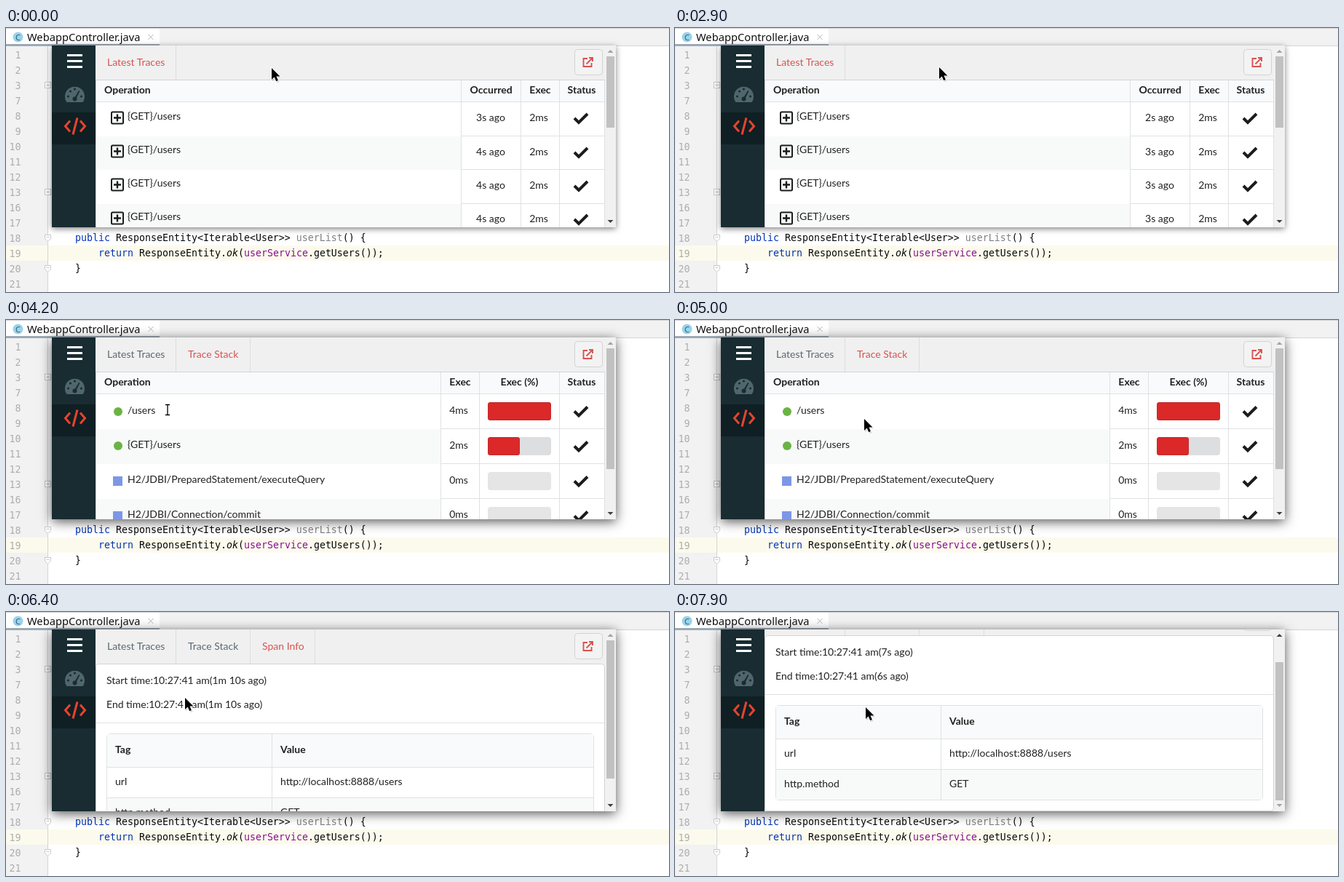
Recreate the animation shown at these times as an HTML page. Size 911x363 px, loop 8000 ms.

```html
<!DOCTYPE html>
<html lang="en">
<head>
<meta charset="utf-8">
<title>Trace popup</title>
<style>
html, body { margin: 0; width: 100%; height: 100%; overflow: hidden; background: #fff; }
#stage { position: relative; width: 911px; height: 363px; overflow: hidden; }
svg { display: block; }
#stage > svg { position: absolute; left: 0; top: 0; }
.code { font: 13.29px "DejaVu Sans Mono", monospace; fill: #080808; white-space: pre; }
.num { fill: #adadad; text-anchor: end; }
.kw { fill: #0033b3; }
.field { fill: #871094; }
.unused { fill: #808080; }
.ui { font: 14px Lato, sans-serif; fill: #212121; }
.mid { text-anchor: middle; }
.b { font-weight: 700; }
.tab { fill: #596872; }
.on { fill: #d9534f; }

#shadow { position: absolute; left: 63px; top: 24px; width: 775px; height: 250px; }
#shadow, #arrow, #ibeam, #pointer, #traces, #stack, #span, #thumb, #up, #down, .age, .ago {
  animation: 8s step-end infinite;
}
#shadow { animation-name: focus; }
@keyframes focus {
  0% { box-shadow: 0 2px 8px rgba(0,0,0,.5); }
  46.25%, 100% { box-shadow: 0 3px 15px rgba(0,0,0,.68); }
}

#traces { animation-name: traces; }
#stack { animation-name: stack; }
#span { animation-name: span; }
@keyframes traces { 0% { visibility: visible; } 52.5%, 100% { visibility: hidden; } }
@keyframes stack { 0% { visibility: hidden; } 52.5% { visibility: visible; } 80%, 100% { visibility: hidden; } }
@keyframes span {
  0% { visibility: hidden; transform: none; }
  80% { visibility: visible; transform: none; }
  91.25% { visibility: visible; transform: translateY(-1px); }
  92.5% { visibility: visible; transform: translateY(-18px); }
  93.75%, 100% { visibility: visible; transform: translateY(-39px); }
}

.age { opacity: 0; }
.age0 { animation-name: age0; }
.age1 { animation-name: age1; }
.age2 { animation-name: age2; }
@keyframes age0 { 0% { opacity: 1; } 11.25%, 100% { opacity: 0; } }
@keyframes age1 { 0% { opacity: 0; } 11.25% { opacity: 1; } 36.25%, 100% { opacity: 0; } }
@keyframes age2 { 0% { opacity: 0; } 36.25%, 100% { opacity: 1; } }
.ago0 { animation-name: ago0; }
.ago1 { animation-name: ago1; }
@keyframes ago0 { 0% { opacity: 1; } 83.75%, 100% { opacity: 0; } }
@keyframes ago1 { 0% { opacity: 0; } 83.75%, 100% { opacity: 1; } }

#thumb { animation-name: thumb; }
@keyframes thumb {
  0% { height: 98px; transform: none; }
  52.5% { height: 166px; transform: none; }
  80% { height: 190px; transform: none; }
  91.25% { height: 190px; transform: translateY(1px); }
  92.5% { height: 190px; transform: translateY(14px); }
  93.75%, 100% { height: 190px; transform: translateY(30px); }
}
#up { animation-name: up; }
#down { animation-name: down; }
@keyframes up { 0% { fill: #a3a3a3; } 92.5%, 100% { fill: #404040; } }
@keyframes down { 0% { fill: #404040; } 93.75%, 100% { fill: #a3a3a3; } }

#pointer { animation-name: pointer; }
@keyframes pointer {
  0% { transform: translate(365px,55px); }
  36.25% { transform: translate(363px,54px); }
  37.5% { transform: translate(345px,62px); }
  38.75% { transform: translate(315px,77px); }
  40% { transform: translate(280px,96px); }
  41.25% { transform: translate(250px,111px); }
  42.5% { transform: translate(230px,121px); }
  43.75% { transform: translate(222px,124px); }
  58.75% { transform: translate(225px,125px); }
  60% { transform: translate(234px,129px); }
  61.25% { transform: translate(246px,133px); }
  62.5% { transform: translate(260px,136px); }
  63.75% { transform: translate(272px,138px); }
  65% { transform: translate(281px,138px); }
  66.25% { transform: translate(286px,137px); }
  68.75% { transform: translate(274px,130px); }
  70% { transform: translate(256px,121px); }
  71.25% { transform: translate(246px,118px); }
  83.75% { transform: translate(249px,121px); }
  85% { transform: translate(256px,127px); }
  86.25% { transform: translate(261px,130px); }
  98.75%, 100% { transform: translate(262px,131px); }
}
#arrow { animation-name: arrow; }
#ibeam { animation-name: ibeam; }
@keyframes arrow {
  0% { opacity: 1; } 43.75% { opacity: 0; } 58.75% { opacity: 1; }
  83.75% { opacity: 0; } 97.5%, 100% { opacity: 1; }
}
@keyframes ibeam {
  0% { opacity: 0; } 43.75% { opacity: 1; } 58.75% { opacity: 0; }
  83.75% { opacity: 1; } 97.5%, 100% { opacity: 0; }
}
</style>
</head>
<body>
<div id="stage">
<svg width="911" height="363">
  <defs>
    <path id="check" d="M-9 1l6 6L9-5" fill="none" stroke="#1b1c1d" stroke-width="4"/>
    <g id="plus" fill="none" stroke="#1b1c1d" stroke-width="2">
      <rect x="-8" y="-8" width="16" height="16" rx="1.5"/>
      <path d="M-5 0H5M0-5V5" stroke-width="2.4"/>
    </g>
    <g id="fold" fill="#fff" stroke="#c4c4c4">
      <rect x="53.5" y="-4.5" width="8" height="8"/>
      <path d="M55-.5h5M57.5-3V2"/>
    </g>
    <g id="foldEnd" fill="#fff" stroke="#c9c9c9">
      <path d="M53.5-4.5h8v5l-4 4-4-4z"/>
      <path d="M55.5-1.5h4"/>
    </g>
  </defs>
  <path fill="#f2f2f2" d="M0 0h911v25H0zM0 25h57v338H0z"/>
  <path fill="#fff" d="M0 1h211v23H0z"/>
  <path fill="#d4d4d4" d="M0 0h911v1H0zM211 24h700v1H211zM57 25h1v338h-1z"/>
  <path fill="#9ca9b5" d="M0 22h211v3H0z"/>
  <circle cx="16.500" cy="12.500" r="7" fill="#9ad3ea"/>
  <text x="16.500" y="16.500" class="mid" style="font:11px 'Open Sans',sans-serif" fill="#245a72">C</text>
  <text x="29" y="18" style="font:14.7px 'Noto Sans',sans-serif" fill="#111">WebappController.java</text>
  <path d="M195.500 9l7 7m0-7l-7 7" stroke="#b4b4b4"/>
  <path fill="#fcfaed" d="M0 299h911v21H0z"/>
  <path fill="#d4d4d4" d="M57 299h1v21h-1z"/>
  <g id="lines" class="code num"></g>
  <use href="#fold" y="79"/><use href="#fold" y="226"/>
  <use href="#foldEnd" y="289"/><use href="#foldEnd" y="331"/>
  <g class="code">
    <text x="95" y="293"><tspan class="kw">public</tspan> ResponseEntity&lt;Iterable&lt;User&gt;&gt; <tspan class="unused">userList</tspan>() {</text>
    <text x="127" y="314"><tspan class="kw">return</tspan> ResponseEntity.<tspan font-style="italic">ok</tspan>(<tspan class="field">userService</tspan>.getUsers());</text>
    <text x="95" y="335">}</text>
  </g>
</svg>

<div id="shadow"></div>

<svg width="911" height="363">
  <path fill="#182c32" d="M63 24h60v250H63z"/>
  <path fill="#0f1f23" d="M63 116h60v44H63z"/>
  <path d="M84 37.500h21M84 45.500h21M84 53.500h21" stroke="#fff" stroke-width="3"/>
  <path d="M83.500 102a13.500 13.500 0 1 1 22 0z" fill="#50666d"/>
  <g fill="#182c32">
    <circle cx="85.500" cy="94" r="1.600"/><circle cx="88.500" cy="87" r="1.600"/>
    <circle cx="94.500" cy="84" r="1.600"/><circle cx="103.500" cy="94" r="1.600"/>
    <circle cx="94.500" cy="97.500" r="3"/>
    <path d="M93.500 97l6.500-11 1.500.8-5.500 11z"/>
  </g>
  <path d="M88 127.500l-6.500 7.500 6.500 7.500M102 127.500l6.500 7.500-6.500 7.500M98 123.500l-6 23" fill="none" stroke="#e8432f" stroke-width="3"/>

  <svg x="123" y="24" width="700" height="250" viewBox="123 24 700 250">
    <path fill="#f0f0f0" d="M123 24h700v250H123z"/>
    <g id="traces"></g>
    <g id="stack"></g>
    <g id="span"></g>
  </svg>

  <path fill="#f1f1f1" d="M823 24h15v250h-15z"/>
  <path id="up" d="M826.500 34l4-4 4 4z"/>
  <path id="down" d="M826.500 264l4 4 4-4z"/>
  <rect id="thumb" x="825" y="39" width="11" height="98" fill="#c1c1c1"/>

  <g id="pointer">
    <g id="arrow">
      <path d="M1 2v16l4-3.500 2.500 5.500 3-1.300-2.500-5.400h5z" fill="#000" opacity=".2"/>
      <path d="M0 0v16l3.700-3.400 2.500 5.600 2.700-1.200-2.400-5.400h5z" stroke="#fff" stroke-width="1.800" paint-order="stroke"/>
    </g>
    <g id="ibeam" fill="none">
      <path id="beam" d="M-3-7.500h2.500l.5.500.5-.5H3M0-7V6M-3 6.500h2.500L0 6l.5.500H3" stroke="#fff" stroke-width="3"/>
      <path d="M-3-7.500h2.500l.5.500.5-.5H3M0-7V6M-3 6.500h2.500L0 6l.5.500H3" stroke="#000" stroke-width="1.300"/>
    </g>
  </g>
</svg>
</div>
<script>
const $ = id => document.getElementById(id);
const box = (x, y, w, h, fill, more = '') =>
  `<rect x="${x}" y="${y}" width="${w}" height="${h}" fill="${fill}" ${more}/>`;
const text = (x, y, s, cls = '') => `<text x="${x}" y="${y}" class="ui ${cls}">${s}</text>`;
const use = (id, x, y) => `<use href="#${id}" x="${x}" y="${y}"/>`;
const LINE = '#e0e1e2', EDGE = '#d4d4d5', STRIPE = '#f8faf9';
const hline = (y, x, w) => box(x, y, w, 1, LINE);
const vline = (x, y, h) => box(x, y, 1, h, LINE);

const TABS = [['Latest Traces', 139, 233], ['Trace Stack', 250, 335], ['Span Info', 352, 424]];

function tabs(count) {
  let s = '';
  TABS.slice(0, count).forEach(([name, x, end], i) => {
    s += text(x, 52, name, i === count - 1 ? 'on' : 'tab') + box(end, 24, 1, 47, '#dcdddd');
  });
  return s + box(781.5, 29.5, 38, 35, '#f3f3f3', 'rx="4" stroke="#d3d3d4"') +
    `<path d="M799 42h-5.500v11h11V48M801 41h5v5M805.500 41.500l-8 8" fill="none" stroke="#d9534f" stroke-width="1.900"/>`;
}

// Frame of a list view: header, column rules, stripes and row rules.
function grid(cols, heads, rows) {
  let s = box(123, 71, 700, 203, '#fff') + box(123, 72, 700, 29, '#f9fafb');
  rows.forEach((y, i) => {
    const h = (rows[i + 1] || 290) - y;
    if (i % 2) s += box(124, y, cols[0] - 124, h, STRIPE);
    s += hline(y - 1, i ? cols[0] : 123, i ? 823 - cols[0] : 700);
  });
  s += cols.map(x => vline(x, 72, 202)).join('') + vline(822, 72, 202);
  s += box(123, 71, 700, 1, EDGE) + box(123, 71, 1, 203, EDGE);
  return s + text(135, 90, 'Operation', 'b') +
    heads.map(([name, x]) => text(x, 90, name, 'b mid')).join('');
}

function traces() {
  let s = tabs(1) + grid([625, 707, 760], [['Occurred', 666.5], ['Exec', 734], ['Status', 791]], [102, 149, 195, 242]);
  [128, 175, 221, 267].forEach((y, i) => {
    s += use('plus', 153, [123.5, 169.5, 215.5, 261.5][i]) + text(167, 126 + 46 * i, '{GET}/users');
    [3, 5, 2].forEach((n, k) => {
      s += text(666, y, `${n + (i > 0)}s ago`, `mid age age${k}`);
    });
    s += text(732, y, '2ms', 'mid') + use('check', 790, y - 5);
  });
  return s;
}

function stack() {
  const rows = [['/users', 4], ['{GET}/users', 2],
    ['H2/JDBI/PreparedStatement/executeQuery', 0], ['H2/JDBI/Connection/commit', 0]];
  let s = tabs(2) + grid([597, 650, 760], [['Exec', 624], ['Exec (%)', 705.5], ['Status', 791]], [102, 150, 198, 246]);
  rows.forEach(([name, ms], i) => {
    const y = 129 + 47.8 * i, top = 113 + 48 * i;
    s += i < 2
      ? `<circle cx="154" cy="${126 + 47 * i}" r="6" fill="#6bb344"/>`
      : box(147, top + 6, 13, 13, '#7d97e6');
    s += text(167, Math.floor(y), name) + text(622, Math.round(y), ms + 'ms', 'mid');
    s += box(662, top, 87, 25, ms ? '#dddee0' : '#e5e5e5', 'rx="4"');
    if (ms) s += box(662, top, ms === 4 ? 87 : 44, 25, '#db2828', 'rx="3.500"') +
      box(662.5, top + .5, ms === 4 ? 86 : 43, 24, 'none', 'rx="3" stroke="#a33" stroke-opacity=".5"');
    s += use('check', 790, 124.5 + 48 * i);
  });
  return s;
}

function span() {
  let s = tabs(3) + box(123.5, 71.5, 699, 241, '#fff', `rx="4" stroke="${EDGE}"`);
  [['Start', 99, '7s'], ['End', 132, '6s']].forEach(([name, y, age]) => {
    ['1m 10s', age].forEach((a, k) => {
      s += text(138, y, `${name} time:10:27:41 am(${a} ago)`, `ago ago${k}`);
    });
  });
  s += hline(152, 124, 698) + box(138.5, 167.5, 669, 130, '#fff', `rx="4" stroke="${LINE}"`);
  s += box(139, 168, 668, 45, '#f9fafb') + box(139, 256, 668, 41, STRIPE);
  s += hline(213, 139, 668) + hline(255, 139, 668) + vline(365, 168, 129);
  [['Tag', 'Value', 194], ['url', 'http://localhost:8888/users', 238], ['http.method', 'GET', 280]]
    .forEach(([tag, value, y], i) => {
      s += text(150, y, tag, i ? '' : 'b') + text(377, y, value, i ? '' : 'b');
    });
  return s;
}

$('lines').innerHTML = [1, 2, 3, 7, 8, 9, 10, 11, 12, 13, 16, 17, 18, 19, 20, 21]
  .map((n, i) => `<text x="20.500" y="${42 + 21 * i}">${n}</text>`).join('');
$('traces').innerHTML = traces();
$('stack').innerHTML = stack();
$('span').innerHTML = span();
</script>
</body>
</html>
```
